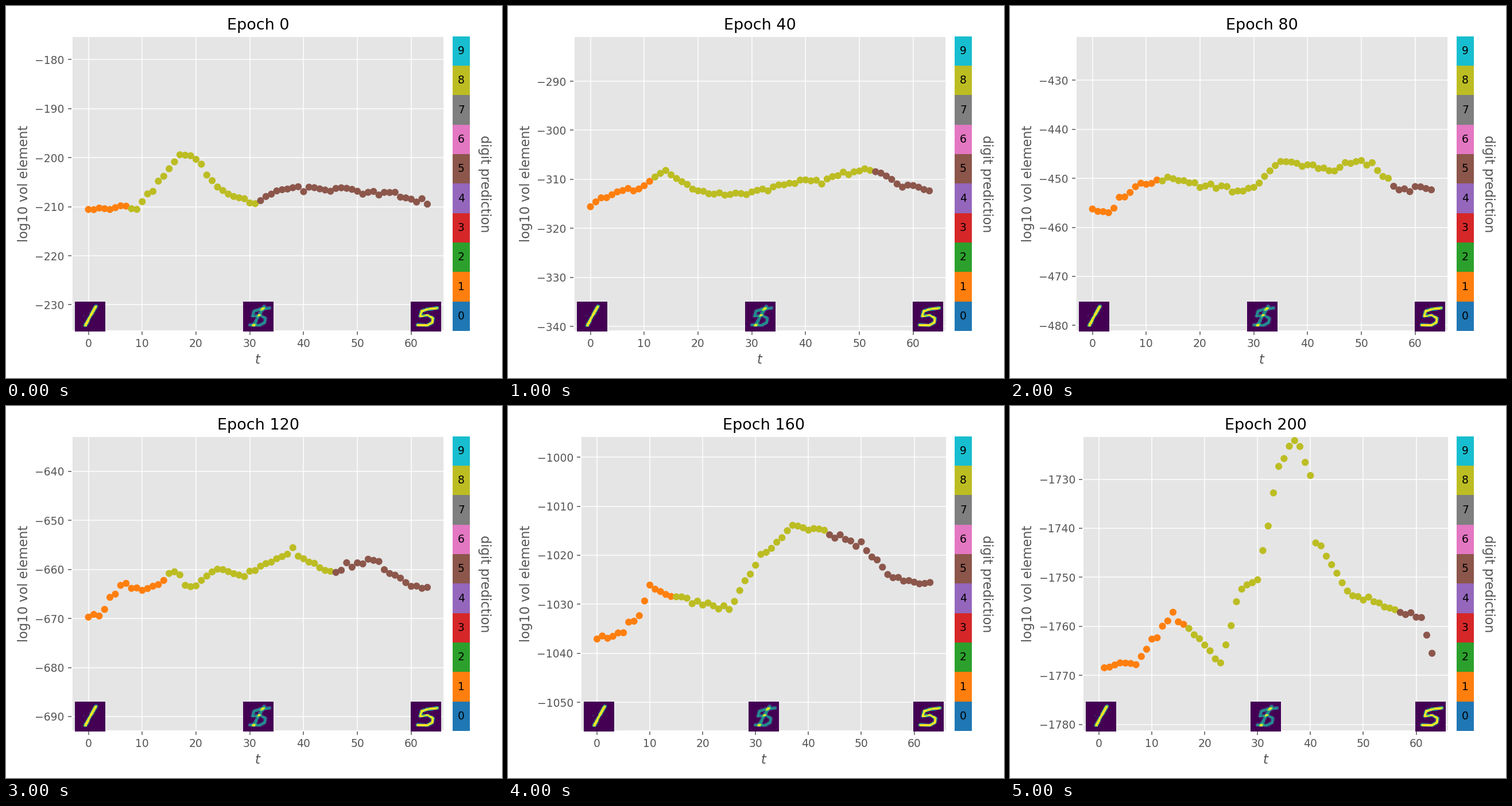
Animation, 864 px wide and 648 px high, one loop 5.5 s. Source, as a matplotlib script:

```python
import numpy as np
import matplotlib.pyplot as plt
from matplotlib.animation import FuncAnimation
from matplotlib.ticker import MultipleLocator

W, H, DPI = 864, 648, 135
TOP, HEIGHT = 53.3, 512.4
THUMB = 28 * DPI / 72
GREY = "#555555"
TAB10 = plt.get_cmap("tab10").colors
T = np.arange(64)

plt.rcParams.update({
    "font.family": "DejaVu Sans", "font.size": 10,
    "axes.facecolor": "#E5E5E5", "axes.edgecolor": "white",
    "axes.linewidth": 1, "axes.axisbelow": True, "axes.grid": True,
    "axes.labelsize": 12, "axes.labelcolor": GREY, "axes.titlesize": 14.4,
    "grid.color": "white", "grid.linestyle": "-", "grid.linewidth": 0.8,
    "xtick.color": GREY, "ytick.color": GREY,
})

runs = {}


def run(epoch, level, to8, to5, *turns):
    """Jittered path through its main turns; the prediction goes 1, 8, 5."""
    t, dev = zip(*turns)
    jitter = np.random.default_rng(epoch).normal(0, 0.35, T.size)
    runs[epoch] = level, to8, to5, np.interp(T, t, dev) + jitter


def between(epoch, level, before, after):
    """Epoch halfway between two others."""
    (_, a8, a5, a), (_, b8, b5, b) = runs[before], runs[after]
    runs[epoch] = level, (a8 + b8) // 2, (a5 + b5) // 2, (a + b) / 2


run(0, -205.3, 8, 32, (0, -5.3), (9, -4.8), (17, 6), (20, 5), (24, -1),
    (31, -4), (36, -1), (57, -2), (63, -4))
run(20, -256.1, 12, 50, (0, -4), (4, .7), (9, -2.7), (14, 4.4), (21, -1.6),
    (38, -2), (46, 1.2), (53, 1), (57, -1.6))
run(60, -373.7, 12, 56, (4, -4.9), (7, -.9), (13, 1.5), (17, -1.3),
    (26, -2.7), (33, -.4), (39, 3.4), (43, .8), (51, 4.9), (63, -1.2))
run(80, -451.1, 13, 56, (3, -5.5), (9, 0), (15, 1.2), (27, -1.8), (31, 0),
    (35, 4.8), (44, 2.6), (50, 5), (57, -1.2))
run(120, -662.9, 15, 46, (2, -6.6), (6, -.2), (11, -1.4), (16, 2.4),
    (19, -1), (24, 3.4), (28, 1.3), (38, 6.6), (45, 2), (52, 5.4), (61, -1))
run(160, -1025.8, 15, 44, (3, -10.8), (8, -6.8), (10, -.5), (14, -2.8),
    (25, -5.4), (31, 5.6), (37, 12), (43, 10.5), (50, 8), (56, 1), (63, 0))
run(200, -1751.3, 17, 57, (0, -30), (1, -17), (7, -16), (14, -6), (23, -16),
    (27, -1), (30, .5), (34, 24.5), (37.5, 30), (40, 22), (41, 9), (47, -2),
    (61, -7), (63, -14))
between(40, -310.9, 20, 60)
between(100, -545, 80, 120)
between(140, -817, 120, 160)
between(180, -1324.4, 160, 200)
EPOCHS = sorted(runs)


def stroke(points, width):
    """28 x 28 picture of a pen stroke through the points."""
    yy, xx = np.mgrid[:28, :28] + 0.5
    dist = np.full((28, 28), 99.0)
    for (x0, y0), (x1, y1) in zip(points, points[1:]):
        dx, dy = x1 - x0, y1 - y0
        u = ((xx - x0) * dx + (yy - y0) * dy) / (dx * dx + dy * dy)
        u = u.clip(0, 1)
        dist = np.minimum(dist, np.hypot(xx - x0 - u * dx, yy - y0 - u * dy))
    return (width - dist).clip(0, 1)


one = stroke([(19.4, 4.8), (9.6, 22.2)], 1.9)
one[13, 8] = 0.3
five = stroke([(24.6, 6.5), (15.8, 7.6), (10, 9.2), (8.7, 14), (15.8, 13),
               (20.4, 16), (19.8, 19.7), (15.3, 22.2), (6.4, 21.8)], 1.7)


def box(x, y, w, h):
    """Pixel box, measured from the top left, as a figure fraction."""
    return [x / W, 1 - (y + h) / H, w / W, h / H]


fig = plt.figure(figsize=(W / DPI, H / DPI), dpi=DPI, facecolor="white")
ax = fig.add_axes(box(115, TOP, 648, HEIGHT))
ax.set_xlim(-3.05, 66.1)
ax.xaxis.set_major_locator(MultipleLocator(10))
ax.yaxis.set_major_locator(MultipleLocator(10))
ax.set_xlabel("$t$")
ax.set_ylabel("log10 vol element")
dots = ax.scatter(T, T, s=36, linewidths=0.5, zorder=2)

bar = fig.add_axes(box(778, 52.8, 30, 513.2))
bar.barh(range(10), 1, height=1, color=TAB10)
bar.set(xlim=(0, 1), ylim=(-0.5, 9.5))
bar.axis("off")
for d in range(10):
    bar.text(0.5, d, str(d), ha="center", va="center", color="black")
fig.text(833 / W, 1 - 309.5 / H, "digit prediction", rotation=270,
         ha="center", va="center", size=12, color=GREY)

thumbs = []
for digit in (one, (one + five) / 2, five):
    thumb = fig.add_axes(box(0, 0, THUMB, THUMB), zorder=3)
    thumb.imshow(digit, cmap="viridis", vmin=0, vmax=1, aspect="auto",
                 interpolation="nearest")
    thumb.axis("off")
    thumbs.append(thumb)


def update(i):
    epoch = EPOCHS[i]
    level, to8, to5, dev = runs[epoch]
    # four-digit tick labels push the axes to the right
    left, right = (115, 763) if level > -1000 else (127, 763.7)
    ax.set_position(box(left, TOP, right - left, HEIGHT))
    mids = left + 31.4, (left + right) / 2, right - 31.4
    for thumb, mid in zip(thumbs, mids):
        thumb.set_position(box(mid - THUMB / 2, 541 - THUMB / 2, THUMB, THUMB))
    ax.set_ylim(level - 30, level + 30)
    ax.set_title(f"Epoch {epoch}", pad=6.4)
    dots.set_offsets(np.column_stack([T, level + dev]))
    digits = np.where(T < to8, 1, np.where(T < to5, 8, 5))
    dots.set_color([TAB10[d] for d in digits])
    return [dots]


anim = FuncAnimation(fig, update, frames=len(EPOCHS), interval=500,
                     repeat=True, repeat_delay=0)
plt.show()
```
